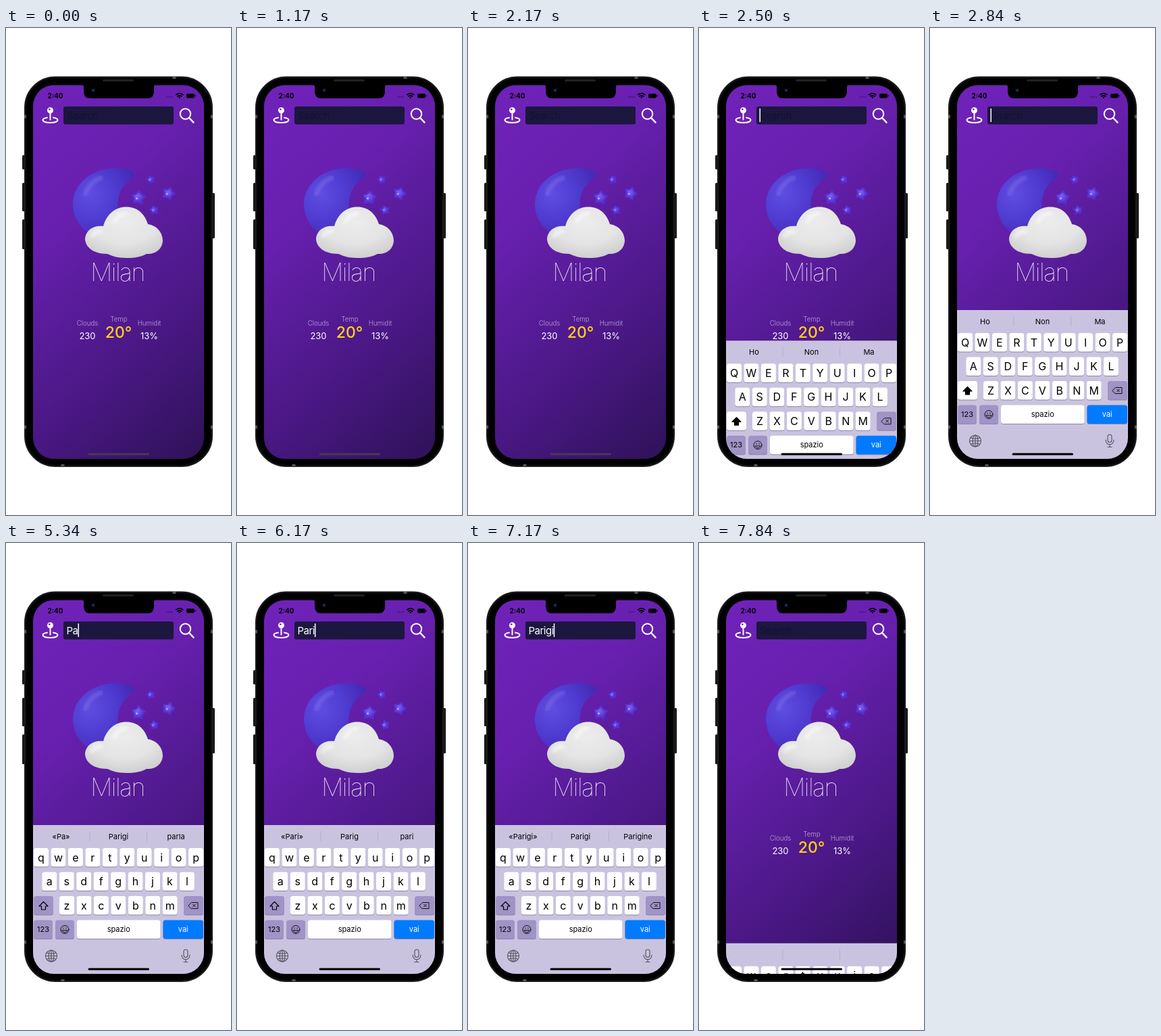
These frames come from a looping animation (333x720 px, 8 s). An HTML page:

```html
<!DOCTYPE html>
<html lang="it">
<head>
<meta charset="utf-8">
<title>Weather search</title>
<style>
  html, body { margin: 0; width: 100%; height: 100%; overflow: hidden; background: #fff; }
  svg { display: block; width: 100%; height: 100%; }
  text { font-family: Inter, Roboto, sans-serif; text-anchor: middle; }
  .label { font-size: 9.7px; font-weight: 300; fill: #bba3dc; }
  .value { font-size: 13px; fill: #fff; }
  .line { fill: none; stroke-linecap: round; stroke-linejoin: round; }
  .input { text-anchor: start; font-size: 15px; letter-spacing: -.5px; }
</style>
</head>
<body>
<svg viewBox="0 0 333 720">
  <defs>
    <linearGradient id="sky" gradientUnits="userSpaceOnUse" x1="40" y1="84" x2="420" y2="510">
      <stop offset="0" stop-color="#7022b9"/>
      <stop offset=".3" stop-color="#6820b0"/>
      <stop offset=".68" stop-color="#4b1886"/>
      <stop offset="1" stop-color="#30125a"/>
    </linearGradient>
    <radialGradient id="moonFill" cx=".28" cy=".4" r=".75">
      <stop offset="0" stop-color="#5f4ce0"/>
      <stop offset=".55" stop-color="#4f3bd0"/>
      <stop offset="1" stop-color="#4529b4"/>
    </radialGradient>
    <radialGradient id="cloudFill" cx=".5" cy=".3" r=".7">
      <stop offset="0" stop-color="#ececec"/>
      <stop offset=".6" stop-color="#e4e4e4"/>
      <stop offset="1" stop-color="#cfcfd0"/>
    </radialGradient>
    <radialGradient id="starFill" cx=".4" cy=".4" r=".6">
      <stop offset="0" stop-color="#7f62ee"/>
      <stop offset="1" stop-color="#4e28cc"/>
    </radialGradient>
    <filter id="soft"><feGaussianBlur stdDeviation="2.5"/></filter>
    <clipPath id="screen"><rect x="40" y="84.5" width="253" height="552.5" rx="31"/></clipPath>
  </defs>

  <g fill="#18191b">
    <rect x="24" y="188" width="5" height="21" rx="1.5"/>
    <rect x="24" y="229" width="5" height="42" rx="1.5"/>
    <rect x="24" y="283" width="5" height="44" rx="1.5"/>
    <rect x="304" y="244" width="5" height="67" rx="1.5"/>
  </g>
  <rect x="28" y="72.5" width="277" height="575.5" rx="45" fill="#050506" stroke="#1b1c1e" stroke-width="2"/>
  <rect x="31.5" y="75.5" width="270" height="569" rx="42"/>
  <path d="M27 131h3M27 590h3M303 131h3M303 590h3M249 72v3M84 645v3" stroke="#55575a" stroke-width="5"/>
  <rect x="143" y="76" width="46" height="3" rx="1.5" fill="#202123"/>

  <g clip-path="url(#screen)">
    <rect x="40" y="84" width="253" height="553" fill="url(#sky)"/>

    <text x="73" y="104" font-size="10" font-weight="700">2:40</text>
    <path d="M237 102h10" stroke="#35105c" stroke-width="1.4" stroke-dasharray="1.5 1.4"/>
    <path class="line" d="M251.8 98.7q5-4 10 0M253.8 101q3-2.3 6 0" stroke="#000" stroke-width="1.7"/>
    <circle cx="256.8" cy="102.7" r="1.2"/>
    <rect x="267" y="97" width="12" height="6.5" rx="2"/>
    <path d="M280.3 99v2.5" stroke="#000"/>

    <g class="line" stroke="#fff" stroke-width="2">
      <path d="M61 132.500c-4 .6-6.5 2-6.5 3.600 0 2.500 5 4 11 4s11-1.500 11-4c0-1.600-2.500-3-6.500-3.600M65.500 125v10.500"/>
      <circle cx="265.500" cy="127" r="7.700"/>
      <path d="M271.200 133l6.300 6.600" stroke-width="2.5"/>
    </g>
    <circle cx="65.500" cy="121.700" r="4.500" fill="#fff"/>
    <circle cx="64.300" cy="120.300" r="1.300" fill="#6b21b2"/>

    <rect x="85" y="116" width="163" height="26.500" rx="3" fill="#1b173f"/>
    <text id="hint" class="input" x="90" y="135" fill="#151230">Search</text>
    <text id="query" class="input" x="89.500" y="134.500" fill="#fff"></text>
    <rect id="caret" y="119" width="1.500" height="20" fill="#fff"/>

    <path d="M190 215C181 206 160 206 146 209C116 216 98 238 99 263C100 281 109 294 122 303L174 292C160 268 163 236 186 223Q192 219 190 215Z" fill="url(#moonFill)"/>
    <path class="line" d="M117 246Q124 227 141 221" stroke="#8979f0" stroke-width="6" opacity=".5" filter="url(#soft)"/>
    <g id="stars" fill="url(#starFill)" stroke="#5630d2" stroke-width="2" stroke-linejoin="round"></g>
    <path d="M150 334C128 334 117 323 117 311C118 299 130 291 144 293C149 275 162 264.500 178 264.500C194 264.500 205 274 210 290C223 292 232 302 232 315C231 328 220 335 208 334C200 338 192 340 178 340C165 340 157 337 150 334Z" fill="url(#cloudFill)"/>
    <path class="line" d="M160 287Q166 275 178 274M127 308Q131 300 141 301" stroke="#fff" stroke-width="5" opacity=".6" filter="url(#soft)"/>

    <text x="165" y="373.500" font-size="36" font-weight="100" letter-spacing="-1.6" fill="#fff">Milan</text>
    <text class="label" x="120.500" y="439.500">Clouds</text>
    <text class="label" x="167" y="433.500">Temp</text>
    <text class="label" x="212" y="439.500">Humidit</text>
    <text class="value" x="120.500" y="460">230</text>
    <text class="value" x="212" y="460">13%</text>
    <text x="166.500" y="458" font-size="23" font-weight="500" fill="#ffd018">20°</text>

    <g id="keyboard">
      <rect x="40" width="253" height="222" fill="#cac3df"/>
      <path d="M124 9v15M208.500 9v15" stroke="#b6aecb"/>
      <g id="suggestions" font-size="11"></g>
      <g id="keys"></g>
      <path id="shiftIcon" class="line" d="M55.500 113.500l-6.500 6.500h3.500v5h6v-5h3.500z" stroke="#000" stroke-width="1.2"/>
      <path class="line" d="M270 119l4.500-4.500h9.500v9h-9.500zM276.500 117l4 4m0-4l-4 4" stroke="#111"/>
      <g class="line" stroke="#111">
        <circle cx="87" cy="154.500" r="6"/>
        <path d="M83 156q4 6 8 0zM85 152v1M89 152v1"/>
      </g>
      <g class="line" stroke="#55515f" stroke-width="1.1">
        <circle cx="67" cy="193.500" r="8.500"/>
        <ellipse cx="67" cy="193.500" rx="4" ry="8.500"/>
        <path d="M67 185v17M58.500 193.500h17M60.500 189q6.500 2.500 13 0M60.500 198q6.500-2.500 13 0"/>
        <rect x="263" y="184" width="6" height="11.500" rx="3"/>
        <path d="M260 192c0 9 12 9 12 0M266 198.500v4M263 202.500h6"/>
      </g>
    </g>
    <rect id="home" x="121.500" y="628.500" width="90.500" height="3" rx="1.5"/>
  </g>

  <path d="M112 84h110q-3 0-3 3v7q0 10-10 10H125q-10 0-10-10v-7q0-3-3-3z"/>
  <circle cx="129" cy="92" r="3" fill="#0a1228"/>
  <circle cx="129" cy="92" r="1.3" fill="#1d4478"/>
</svg>

<script>
const LOOP = 8000, STEP = 500 / 3;
const SCREEN_BOTTOM = 637, KEYBOARD_HEIGHT = 220;
const OPEN = 14 * STEP, CLOSE = 46 * STEP, SLIDE = 500;
const BLINK = 1000, BLINK_ON = 600;
const DARK_KEY = '#a093c6';

// Each entry: time, typed text, suggestions
const typing = [
  [OPEN, '', ['Ho', 'Non', 'Ma']],
  [3800, 'P', ['«P»', 'per', 'perché']],
  [5000, 'Pa', ['«Pa»', 'Parigi', 'parla']],
  [5500, 'Par', ['«Par»', 'Parigi', 'parla']],
  [6000, 'Pari', ['«Pari»', 'Parig', 'pari']],
  [6500, 'Parig', ['«Parig»', 'Parigi', 'parigi']],
  [7000, 'Parigi', ['«Parigi»', 'Parigi', 'Parigine']],
  [CLOSE, '', ['', '', '']]
];

const $ = id => document.getElementById(id);

function add(parent, tag, attrs, content = '') {
  const node = document.createElementNS('http://www.w3.org/2000/svg', tag);
  for (const name in attrs) node.setAttribute(name, attrs[name]);
  node.textContent = content;
  parent.append(node);
  return node;
}

function addKey(x, y, width, label = '', fill = '#fff', size = 11, color = '#000') {
  add($('keys'), 'rect', { x, y: y + 1, width, height: 27.5, rx: 3.5, fill: '#8c83a8' });
  const cap = add($('keys'), 'rect', { x, y, width, height: 27.5, rx: 3.5, fill });
  const text = add($('keys'), 'text', {
    x: x + width / 2, y: y + (size > 12 ? 19.5 : 17.5), 'font-size': size, fill: color
  }, label);
  return { cap, text };
}

const letters = [['QWERTYUIOP', 41], ['ASDFGHJKL', 53.3], ['ZXCVBNM', 79]].flatMap(([row, left], r) =>
  [...row].map((letter, i) => ({ letter, ...addKey(left + i * 25.45, 34 + r * 35.5, 22, letter, '#fff', 16) })));
const shift = addKey(41, 105, 29);
addKey(263, 105, 29, '', DARK_KEY);
addKey(41, 140.5, 28, '123', DARK_KEY);
addKey(73, 140.5, 28, '', DARK_KEY);
addKey(105, 140.5, 123.5, 'spazio');
addKey(232.5, 140.5, 59.5, 'vai', '#007aff', 11, '#fff');

const slots = [81.5, 166.5, 251.5].map(x => add($('suggestions'), 'text', { x, y: 20.5 }));

for (const [x, y, radius, turn] of [[196, 251, 10, 5], [214, 224, 5.5, -15], [240.5, 244.5, 9, 20], [219, 269, 6, -10]]) {
  const points = Array.from({ length: 10 }, (_, i) => {
    const angle = (i * 36 - 90 + turn) * Math.PI / 180, r = i % 2 ? radius * .66 : radius;
    return [x + r * Math.cos(angle), y + r * Math.sin(angle)];
  });
  add($('stars'), 'polygon', { points: points.join(' ') });
  add($('stars'), 'circle', { cx: x - radius * .25, cy: y + radius * .1, r: radius * .16, fill: '#b6a8f6', stroke: 'none' });
}

const slide = ms => 1 - (1 - Math.min(1, Math.max(0, ms / SLIDE))) ** 3.9;

function render(time) {
  // The small offset keeps a step from rounding down to the one before
  const t = Math.floor(time % LOOP / STEP) * STEP + .01;
  const shown = slide(t - OPEN) - slide(t - CLOSE);
  const focused = t >= OPEN && t < CLOSE;
  const [since, query, words] = typing.findLast(entry => t >= entry[0]) || typing[0];
  const capitals = t < typing[1][0];

  $('keyboard').setAttribute('transform', `translate(0 ${SCREEN_BOTTOM - KEYBOARD_HEIGHT * shown})`);
  $('home').setAttribute('fill', shown > 0 ? '#000' : '#483858');

  $('query').textContent = query;
  $('hint').style.display = query ? 'none' : '';
  $('caret').setAttribute('x', 89.5 + (query ? $('query').getComputedTextLength() : 0));
  $('caret').style.display = focused && (t - since) % BLINK < BLINK_ON ? '' : 'none';

  slots.forEach((slot, i) => slot.textContent = words[i]);
  for (const { letter, text } of letters) text.textContent = capitals ? letter : letter.toLowerCase();
  shift.cap.setAttribute('fill', capitals ? '#fff' : DARK_KEY);
  $('shiftIcon').style.fill = capitals ? '#000' : 'none';
}

function tick() {
  render(performance.now());
  requestAnimationFrame(tick);
}
tick();
</script>
</body>
</html>
```
